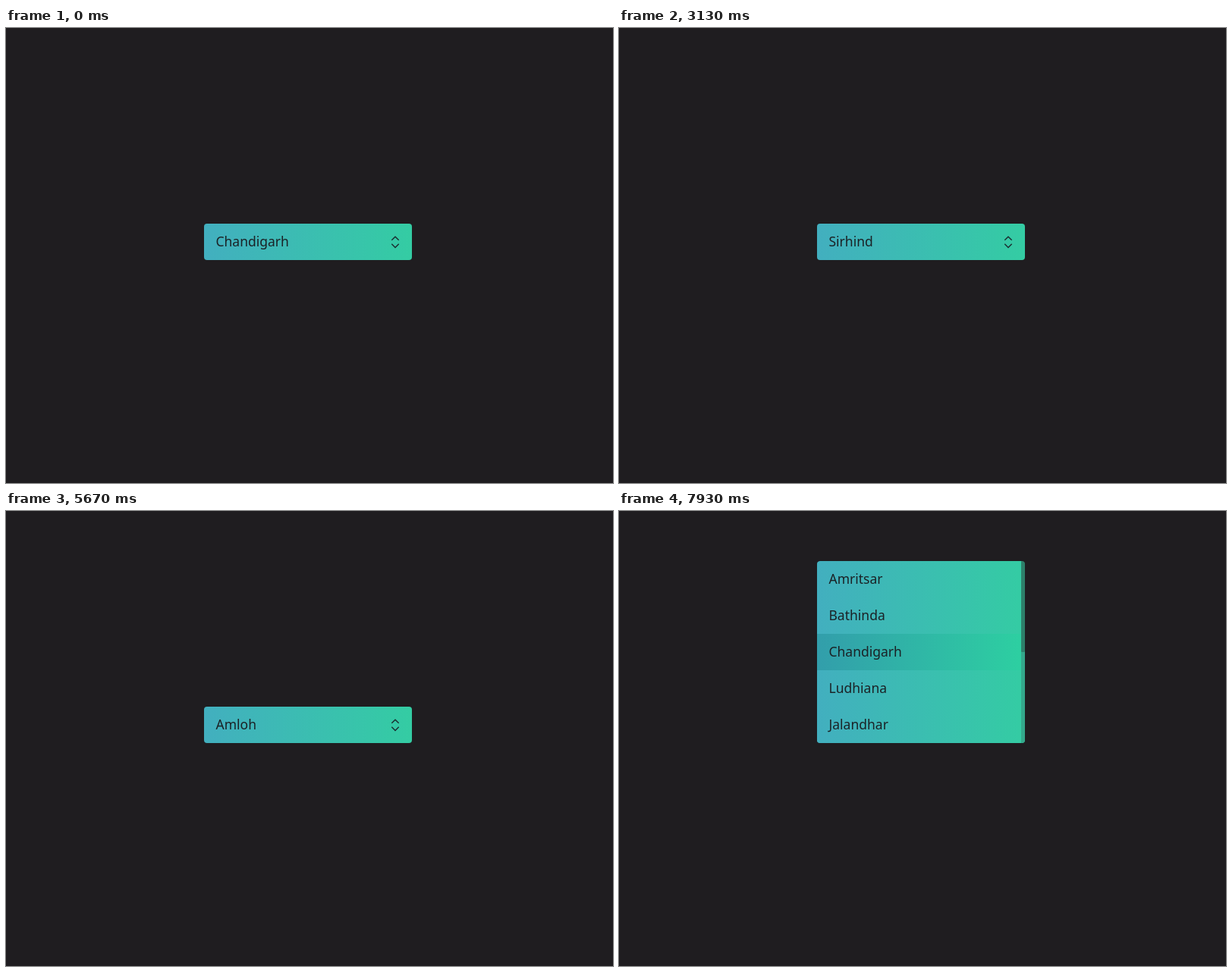
An HTML page for the animation above (8000 ms loop, 800 by 600 pixels).

```html
<!DOCTYPE html>
<html lang="en">
<head>
<meta charset="utf-8">
<title>City select</title>
<style>
  @property --scroll { syntax: "<length>"; inherits: true; initial-value: 0px; }
  @property --row { syntax: "<integer>"; inherits: true; initial-value: 2; }

  html, body { margin: 0; width: 100%; height: 100%; overflow: hidden; background: #1f1d20; }
  .stage {
    position: relative; width: 800px; height: 600px; overflow: hidden;
    font: 500 17.5px/47px "Noto Sans", sans-serif; color: #1b2226;
  }
  .button, .menu {
    position: absolute; left: 260.5px; width: 274.5px; overflow: hidden; border-radius: 4px;
    background: linear-gradient(90deg, #42afbf, #34cca3);
  }
  .button { top: 258px; height: 48px; }
  .menu {
    top: 162px; height: 240px;
    animation: 8s infinite;
    animation-name: reveal, fade, place, scroll;
    animation-timing-function: ease-out, linear, step-end, ease-in-out;
  }
  .row { height: 48px; padding-left: 16px; white-space: nowrap; }
  .labels { animation: choose 8s step-end infinite; }
  .list { position: relative; transform: translateY(calc(-1 * var(--scroll))); }
  .list .row { position: relative; }
  .hover, .check { position: absolute; left: 0; top: calc(var(--row) * 48px); }
  .hover {
    width: 100%; height: 48px;
    background: linear-gradient(90deg, #329eab, #2dd0a1);
    animation: hover 8s step-end infinite;
  }
  .check { animation: check 8s step-end infinite; }
  svg { position: absolute; left: 0; top: 0; width: 274px; height: 48px; fill: none; stroke: #1b2c2f; }
  .track, .thumb { position: absolute; top: 0; right: 0; width: 5px; }
  .track { height: 240px; background: #34a88b; }
  .thumb { height: 120px; border-radius: 1px; background: #2d806a; transform: translateY(calc(.5 * var(--scroll))); }

  @keyframes reveal {
    0%, 7.5%, 34.6%, 42.5%, 63.4% { clip-path: inset(96px 0 96px 0 round 4px); }
    10%, 32.75%, 45%, 61.5%, 74.75%, 100% { clip-path: inset(0 0 0 0 round 4px); }
    72.25% { clip-path: inset(192px 0 0 0 round 4px); }
  }
  @keyframes fade {
    0%, 7.5%, 34.6%, 42.5%, 63.4%, 72.25% { opacity: 0; }
    8%, 32.75%, 43%, 61.5%, 72.75%, 100% { opacity: 1; }
  }
  @keyframes place {
    0% { top: 162px; }
    68%, 100% { top: 66px; }
  }
  @keyframes scroll {
    0%, 18.75%, 86.65%, 100% { --scroll: 0px; }
    27%, 77.9% { --scroll: 240px; }
  }
  @keyframes choose {
    0% { transform: none; }
    32.75% { transform: translateY(-48px); }
    61.5%, 100% { transform: translateY(-96px); }
  }
  @keyframes hover {
    0% { --row: 2; }
    28% { --row: 7; }
    53% { --row: 8; }
    55% { --row: 9; }
    90%, 100% { --row: 2; }
  }
  @keyframes check {
    0% { --row: 2; }
    36% { --row: 7; }
    66%, 100% { --row: 9; }
  }
</style>
</head>
<body>
<div class="stage">
  <div class="button">
    <div class="labels">
      <div class="row">Chandigarh</div>
      <div class="row">Sirhind</div>
      <div class="row">Amloh</div>
    </div>
    <svg stroke-width="1.4"><path d="M247.3 21.8 252 17.2 256.7 21.8M247.3 26.8 252 31.4 256.7 26.8"/></svg>
  </div>
  <div class="menu">
    <div class="list">
      <div class="hover"></div>
      <div class="row">Amritsar</div>
      <div class="row">Bathinda</div>
      <div class="row">Chandigarh</div>
      <div class="row">Ludhiana</div>
      <div class="row">Jalandhar</div>
      <div class="row">Patiala</div>
      <div class="row">Mohali</div>
      <div class="row">Sirhind</div>
      <div class="row">Khanna</div>
      <div class="row">Amloh</div>
      <div class="check"><svg stroke-width="1.7"><path d="M240.3 24.7 244 28.3 252.4 20.2"/></svg></div>
    </div>
    <div class="track"></div>
    <div class="thumb"></div>
  </div>
</div>
</body>
</html>
```
